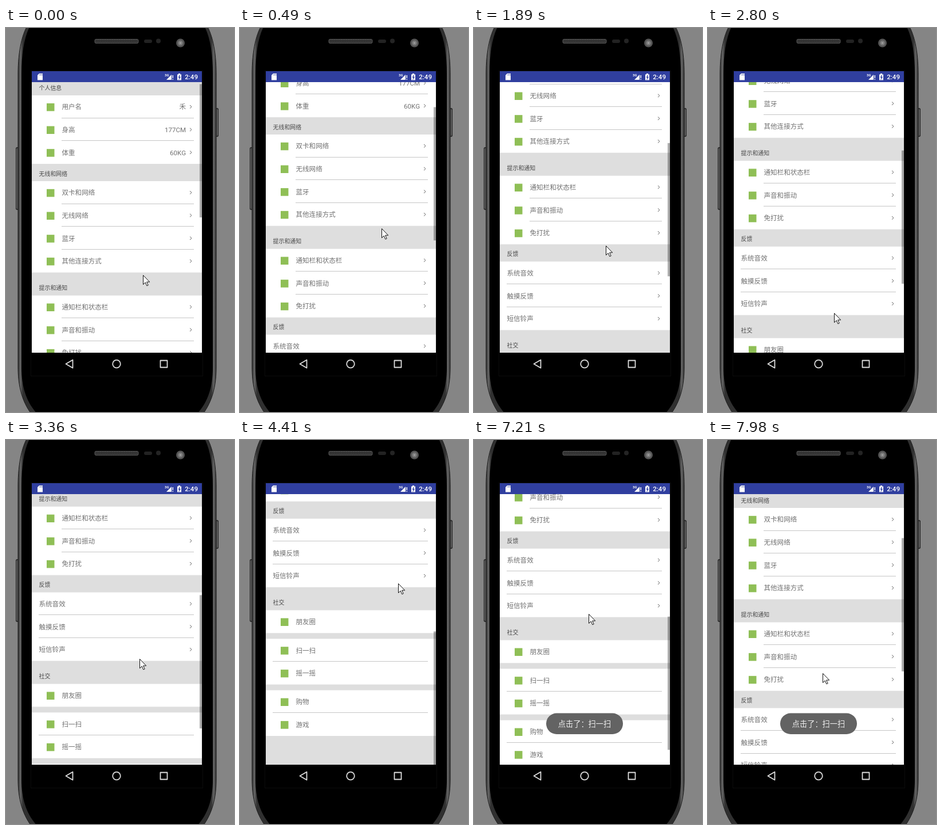
An HTML page for the animation above (8 s loop, 398 px wide and 667 px high).

```html
<!DOCTYPE html>
<html lang="zh-CN">
<head>
<meta charset="utf-8">
<style>
  html, body { margin: 0; width: 100%; height: 100%; overflow: hidden; background: #858585; }
  svg { display: block; width: 398px; height: 667px; }
  text { font-family: Roboto, "Noto Sans CJK SC", "Noto Sans CJK", sans-serif; }
  .head { font-size: 9.95px; fill: #484848; }
  .row { font-size: 11.55px; fill: #727272; }
  .value { text-anchor: end; }
  .pressed { fill: #85b673; }
  .toast { font-size: 13.2px; fill: #eee; text-anchor: middle; }
</style>
</head>
<body>
<svg viewBox="0 0 398 667">
  <defs>
    <clipPath id="view"><rect x="45" y="94" width="297" height="470"/></clipPath>
    <linearGradient id="rim">
      <stop offset="0" stop-color="#2b2b2b"/><stop offset=".012" stop-color="#666"/>
      <stop offset=".025" stop-color="#303030"/><stop offset=".975" stop-color="#303030"/>
      <stop offset=".988" stop-color="#666"/><stop offset="1" stop-color="#2b2b2b"/>
    </linearGradient>
    <pattern id="mesh" width="3" height="3" patternUnits="userSpaceOnUse">
      <rect width="3" height="3" fill="#222"/><path d="M0 0L3 3M3 0L0 3" stroke="#555" stroke-width=".6"/>
    </pattern>
  </defs>

  <!-- phone -->
  <rect width="398" height="667" fill="#858585"/>
  <g fill="#4a4a4a" stroke="#222">
    <rect x="17.5" y="207.5" width="6" height="108" rx="1.5"/>
    <rect x="364.5" y="139.5" width="6" height="49" rx="1.5"/>
  </g>
  <path d="M19 210V313M369 142V186" stroke="#777"/>
  <path d="M41-10C28 8 21 40 21 80V590C21 630 32 658 52 680H336C356 658 367 630 367 590V80C367 40 360 8 347-10Z" fill="url(#rim)" stroke="#1c1c1c"/>
  <path d="M46-10C33 8 27 40 27 80V590C27 628 38 654 58 674H330C350 654 361 628 361 590V80C361 40 355 8 342-10Z"/>
  <rect x="155" y="19.5" width="76" height="7" rx="2" fill="url(#mesh)" stroke="#555"/>
  <rect x="241" y="20" width="14" height="6" rx="3" fill="#222"/>
  <circle cx="266" cy="22.5" r="4" fill="#242424"/>
  <circle cx="304.5" cy="26" r="7.5" fill="#555"/>
  <circle cx="304.5" cy="26" r="4.5" fill="#777"/>
  <circle cx="304.5" cy="26" r="2" fill="#999"/>
  <rect x="43.5" y="74.5" width="300" height="530" fill="#000" stroke="#0c0c0c"/>

  <!-- status bar -->
  <rect x="45" y="75" width="297" height="19" fill="#303f9f"/>
  <g fill="#fff">
    <path d="M58 79H64V90.500H55V82Z"/>
    <path d="M289 81V90H280Z"/>
    <path d="M290.500 82H292V87H290.500ZM290.500 88.500H292V90H290.500Z"/>
    <path d="M301 79H304V80.500H306V90.500H299V80.500H301Z"/>
    <text x="277" y="84" font-size="6" font-weight="700">3G</text>
    <text x="335" y="89" font-size="11.6" font-weight="500" text-anchor="end">2:49</text>
  </g>
  <path d="M59 80V82.500M61 80V82.500M63 80V82.500M303.500 81.500L301 86H303L301.800 89.500L304.500 85H302.500Z" stroke="#303f9f" stroke-width=".7" fill="#303f9f"/>

  <!-- navigation bar -->
  <g fill="none" stroke="#ddd" stroke-width="1.8" stroke-linejoin="round">
    <path d="M104.500 583.500L116.500 576.500V590.500Z"/>
    <circle cx="193" cy="583.500" r="6.800"/>
    <rect x="269.500" y="577.500" width="12" height="12"/>
  </g>

  <g clip-path="url(#view)">
    <rect x="45" y="94" width="297" height="470" fill="#dedede"/>
    <g id="list"></g>
    <rect id="thumb" x="338" width="4" height="231.500" fill="#000" fill-opacity=".32"/>
  </g>

  <g id="toast">
    <rect x="126" y="474.500" width="134" height="36.500" rx="18.250" fill="#636363"/>
    <text id="message" class="toast" x="193" y="497.500"></text>
  </g>
  <path id="cursor" d="M.5.500V16.500L4.200 13L6.800 18.800L9.200 17.800L6.600 12.100H11.700Z" fill="#fff" stroke="#111" stroke-width="1"/>
</svg>
<script>
const $ = id => document.getElementById(id);
const ROW = 119 / 3, TOP = 94, MAX_SCROLL = 484;
const STEP = 70, LOOP = 8000;

// [header height, title, line start, has icon, has arrow, rows]
const sections = [
  [30, '个人信息', 97, 1, 1, ['用户名|禾', '身高|177CM', '体重|60KG']],
  [30, '无线和网络', 97, 1, 1, ['双卡和网络', '无线网络', '蓝牙', '其他连接方式']],
  [40, '提示和通知', 97, 1, 1, ['通知栏和状态栏', '声音和振动', '免打扰']],
  [30, '反馈', 57, 0, 1, ['系统音效', '触摸反馈', '短信铃声']],
  [40, '社交', 57, 1, 0, ['朋友圈']],
  [10, '', 57, 1, 0, ['扫一扫', '摇一摇']],
  [10, '', 57, 1, 0, ['购物', '游戏']]
];

function add(tag, attrs, text = '') {
  const el = document.createElementNS('http://www.w3.org/2000/svg', tag);
  for (const key in attrs) el.setAttribute(key, attrs[key]);
  el.textContent = text;
  return $('list').appendChild(el);
}

const labels = {};
let y = 0;
for (const [height, title, lineX, icon, arrow, rows] of sections) {
  y += height;
  if (title) add('text', { class: 'head', x: 57.5, y: y - 9.2 }, title);
  add('rect', { x: 45, y, width: 297, height: ROW * rows.length, fill: '#fff' });
  rows.forEach((row, i) => {
    const [name, value] = row.split('|');
    const mid = y + ROW / 2;
    if (icon) add('rect', { x: 71, y: mid - 6, width: 13.5, height: 13.5, fill: '#8fbf56' });
    labels[name] = add('text', { class: 'row', x: icon ? 97.5 : 57.5, y: mid + 4.5 }, name);
    if (value) add('text', { class: 'row value', x: 314, y: mid + 4.5 }, value);
    if (arrow) add('path', { d: `M321 ${mid - 2.8}l3 2.800l-3 2.800`, fill: 'none', stroke: '#666' });
    y += ROW;
    if (i < rows.length - 1) {
      add('rect', { x: lineX, y: Math.round(y) - 1, width: 328 - lineX, height: 1, fill: '#c6c6c6' });
    }
  });
}

const scrollKeys = [[0, 7], [700, 123], [1400, 123], [2030, 241], [2800, 241], [3360, 356],
  [3990, 484], [7070, 484], [7490, 327], [7630, 220], [7770, 165], [7840, 165], [7980, 155]];
const cursorKeys = [[0, 239, 429], [700, 250, 313], [1400, 221, 470], [2030, 232, 352],
  [2590, 220, 495], [2800, 220, 495], [3360, 233, 380], [3990, 258, 252], [4270, 277, 248],
  [4410, 276, 249], [4550, 240, 328], [4620, 240, 328], [5110, 231, 318], [5320, 230, 317],
  [5460, 230, 325], [5810, 230, 377], [6020, 230, 377], [6160, 229, 379], [6440, 229, 379],
  [6930, 200, 250], [7070, 200, 250], [7490, 200, 405], [8000, 200, 405]];
const barKeys = [[0, 1], [4410, 1], [4900, 0], [7070, 0], [7140, 1]];
const toastKeys = [[0, 0], [5390, 0], [5670, 1]];

function at(keys, t, column = 1) {
  const i = keys.findIndex(k => k[0] > t);
  if (i < 0) return keys[keys.length - 1][column];
  const a = keys[i - 1], b = keys[i];
  return a[column] + (b[column] - a[column]) * (t - a[0]) / (b[0] - a[0]);
}

function draw(now) {
  const t = Math.floor((now % LOOP) / STEP) * STEP;
  const scroll = at(scrollKeys, t);
  $('list').setAttribute('transform', `translate(0 ${TOP - Math.round(scroll)})`);
  $('thumb').setAttribute('y', TOP + scroll / MAX_SCROLL * 238.5);
  $('thumb').setAttribute('opacity', at(barKeys, t));
  $('toast').setAttribute('opacity', at(toastKeys, t));
  $('message').textContent = '点击了：' + (t < 6580 ? '朋友圈' : '扫一扫');
  labels['朋友圈'].classList.toggle('pressed', t >= 5250 && t < 6580);
  labels['扫一扫'].classList.toggle('pressed', t >= 6370 && t < 6580);
  const x = Math.round(at(cursorKeys, t)), cy = Math.round(at(cursorKeys, t, 2));
  $('cursor').setAttribute('transform', `translate(${x} ${cy})`);
}

const start = performance.now();
function tick() {
  draw(performance.now() - start);
  requestAnimationFrame(tick);
}
tick();
</script>
</body>
</html>
```
